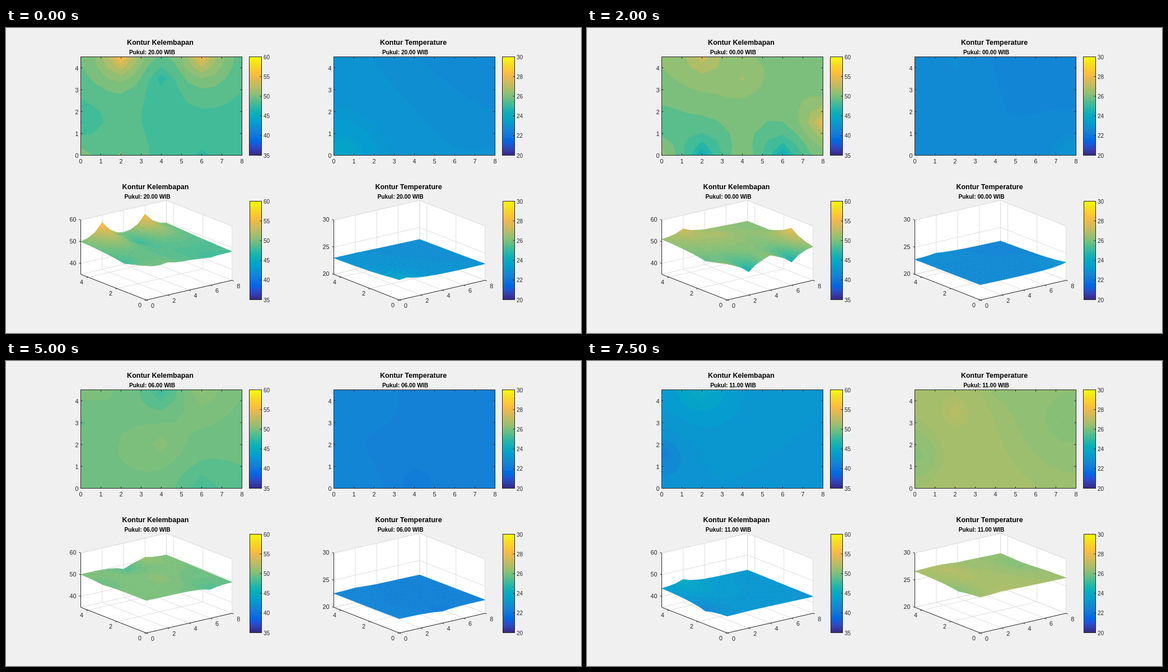
Animation, 1027 px wide and 545 px high, one loop 8 s. Source, as an HTML page with a canvas:

```html
<!DOCTYPE html>
<html lang="id">
<head>
<meta charset="utf-8">
<title>Kontur</title>
<style>
  html, body { margin: 0; width: 100%; height: 100%; overflow: hidden; background: #f0f0f0; }
  canvas, svg { position: absolute; left: 0; top: 0; width: 1027px; height: 545px; }
  text { font-family: "Liberation Sans", Arial, sans-serif; fill: #262626; }
  .bold { font-weight: bold; fill: #000; }
</style>
</head>
<body>
<canvas id="plot" width="1027" height="545"></canvas>
<svg id="labels" viewBox="0 0 1027 545"></svg>
<script>
const ctx = document.getElementById('plot').getContext('2d');
const labels = document.getElementById('labels');
const STEP_MS = 500, STEPS = 16, FIRST_HOUR = 20, DAWN = 8, INK = '#262626';
const NX = 12, NY = 9, W = 8, H = 4.5;

// The mean follows the night until dawn, then the morning.
// A peak is [x, y, height, step at which it is strongest].
const humidity = {
  mean: s => s < DAWN ? 48.7 + 0.43 * s : 52.1 - (s - DAWN) * (1 + 0.04 * (s - DAWN)),
  tilt: [-0.06, 0.08], reach: 0.95,
  peaks: [
    [2, 4.5, 7.8, 0], [6, 4.5, 7.3, 0], [4, 3.5, -3, 0], [2, 0, 2, 0],
    [0, 1.5, -4.8, 2], [0, 0, 6, 2], [2, 0, -6.5, 3], [6, 0, -6.5, 3], [4, 0, 2.5, 3],
    [8, 1.5, 5.5, 4], [4, 3.5, 2, 3], [2, 4.5, 3, 4.5], [8, 3, -2.6, 6],
    [4, 4.5, -3.4, 7], [0, 3, -2.4, 8],
    [4, 4.5, -2.6, 11], [6, 4.5, 2, 11], [4, 2, 1.5, 11], [6, 0, -1.8, 11],
    [2, 4.5, 2.2, 15], [0, 1.5, -2.2, 15]
  ]
};
const temperature = {
  mean: s => s < DAWN ? 22.95 - 0.02 * s * s : 21.67 + (s - DAWN) * (0.3 + 0.058 * (s - DAWN)),
  tilt: [-0.02, -0.03], reach: 1.3,
  peaks: [
    [0.5, 0, 0.9, 0], [2, 4.5, 0.5, 3], [8, 0, 0.9, 3], [3, 3, 0.2, 6], [2, 2, -0.25, 8],
    [4, 0, -0.5, 11], [2, 4.5, 0.3, 11], [2, 0, 0.5, 13], [4, 4.5, -0.4, 13],
    [2, 3.5, 0.5, 15], [0, 1.5, -0.7, 15], [7.5, 3, -0.5, 15]
  ]
};
const panels = [
  { name: 'Kontur Kelembapan', dx: 0, field: humidity, lo: 35, hi: 60, zTicks: [40, 50, 60], barStep: 5 },
  { name: 'Kontur Temperature', dx: 452, field: temperature, lo: 20, hi: 30, zTicks: [20, 25, 30], barStep: 2 }
];
const bars = [{ x: 434.5, y: 51.5, w: 22 }, { x: 435.5, y: 309.5, w: 21 }];
const BAR_HEIGHT = 176;

const stops = ('352a87 353dad 2053d4 0268e1 0d75dc 1481d6 108ed2 079ccf 06a7c6 0faeb9 25b5a9 ' +
  '42bb98 65be86 87bf77 a5be6b c0bc60 d9ba56 f1b94a ffc337 fad32a f5e41d f9fb0e')
  .split(' ').map(hex => [0, 2, 4].map(i => parseInt(hex.slice(i, i + 2), 16)));
const colours = Array.from({ length: 64 }, (_, i) => {
  const k = Math.min(stops.length - 2, Math.floor(i / 3)), f = i / 3 - k;
  return `rgb(${stops[k].map((c, j) => Math.round(c + (stops[k + 1][j] - c) * f))})`;
});
const colourOf = (p, v) =>
  colours[Math.max(0, Math.min(63, Math.floor((v - p.lo) / (p.hi - p.lo) * 64)))];

// Pointed peaks that swell and fade over about two steps, on a tilted plane.
function sampleGrid({ mean, tilt, reach, peaks }, step) {
  const active = peaks.map(([x, y, height, at]) => [x, y, height * Math.exp(-(((step - at) / 2) ** 2))]);
  return Array.from({ length: NY + 1 }, (_, j) => Array.from({ length: NX + 1 }, (_, i) => {
    const x = i * W / NX, y = j * H / NY;
    const plane = mean(step) + tilt[0] * (x - W / 2) + tilt[1] * (y - H / 2);
    return active.reduce((v, [a, b, h]) => v + h * Math.exp(-Math.hypot(x - a, y - b) / reach), plane);
  }));
}

function levelStep(range) {
  const decade = 10 ** Math.floor(Math.log10(range)), n = range / decade;
  return decade / (n < 1.2 ? 10 : n < 2.4 ? 5 : n < 6 ? 2 : 1);
}

function trace(points) {
  points.forEach((q, i) => i ? ctx.lineTo(q[0], q[1]) : ctx.moveTo(q[0], q[1]));
}
function line(colour, ...points) {
  ctx.strokeStyle = colour;
  ctx.lineWidth = 1;
  ctx.beginPath();
  trace(points);
  ctx.stroke();
}
function fill(colour, points) {
  ctx.fillStyle = colour;
  ctx.beginPath();
  trace(points);
  ctx.closePath();
  ctx.fill();
}
function frame(x, y, w, h) {
  ctx.strokeStyle = INK;
  ctx.lineWidth = 1;
  ctx.strokeRect(x, y, w, h);
}

// The part of a cell that lies above a level.
function clipAbove(corners, level) {
  const out = [];
  corners.forEach((a, i) => {
    const b = corners[(i + 1) % corners.length];
    if (a[2] >= level) out.push(a);
    if ((a[2] >= level) !== (b[2] >= level)) {
      const f = (level - a[2]) / (b[2] - a[2]);
      out.push([a[0] + (b[0] - a[0]) * f, a[1] + (b[1] - a[1]) * f]);
    }
  });
  return out;
}

function drawContour(p, grid) {
  const left = 133.5 + p.dx, top = 51.5, width = 288, height = 176;
  const px = x => left + x * width / W, py = y => top + height * (1 - y / H);
  const all = grid.flat(), min = Math.min(...all), max = Math.max(...all);
  const gap = levelStep(max - min);
  ctx.fillStyle = colourOf(p, min);
  ctx.fillRect(left, top, width, height);
  for (let n = Math.ceil(min / gap); n * gap < max; n++) {
    ctx.fillStyle = colourOf(p, n * gap + 1e-6);
    ctx.beginPath();
    for (let j = 0; j < NY; j++) for (let i = 0; i < NX; i++) {
      const corners = [[i, j], [i + 1, j], [i + 1, j + 1], [i, j + 1]]
        .map(([a, b]) => [px(a * W / NX), py(b * H / NY), grid[b][a]]);
      const part = clipAbove(corners, n * gap);
      if (part.length > 2) { trace(part); ctx.closePath(); }
    }
    ctx.fill();
  }
  frame(left, top, width, height);
  for (let x = 1; x < W; x++)
    for (const [y, d] of [[top + height, -3], [top, 3]]) line(INK, [px(x), y], [px(x), y + d]);
  for (let y = 1; y < H; y++)
    for (const [x, d] of [[left, 3], [left + width, -3]]) line(INK, [x, py(y)], [x + d, py(y)]);
}

const project = (p, x, y, z) => [
  250.5 + p.dx + 19.15 * x - 26 * y,
  486 - 4.4 * x - 10.2 * y - 97 * (z - p.lo) / (p.hi - p.lo)
];

function drawSurface(p, grid) {
  const at = (x, y, z) => project(p, x, y, z);
  const { lo, hi } = p, pale = '#dedede';
  fill('#fff', [at(0, 0, lo), at(W, 0, lo), at(W, 0, hi), at(W, H, hi), at(0, H, hi), at(0, H, lo)]);
  for (const x of [0, 2, 4, 6, 8]) line(pale, at(x, 0, lo), at(x, H, lo), at(x, H, hi));
  for (const y of [0, 2, 4, H]) line(pale, at(0, y, lo), at(W, y, lo), at(W, y, hi));
  for (const z of [...p.zTicks, hi]) line(pale, at(0, H, z), at(W, H, z), at(W, 0, z));

  const sub = 3, cols = NX * sub, rows = NY * sub;
  const value = (i, j) => {
    const a = Math.min(NX - 1, Math.floor(i / sub)), b = Math.min(NY - 1, Math.floor(j / sub));
    const f = i / sub - a, g = j / sub - b;
    return (grid[b][a] * (1 - f) + grid[b][a + 1] * f) * (1 - g) +
      (grid[b + 1][a] * (1 - f) + grid[b + 1][a + 1] * f) * g;
  };
  const node = (i, j) => at(i * W / cols, j * H / rows, value(i, j));
  ctx.lineWidth = 0.6;
  for (let i = cols - 1; i >= 0; i--) for (let j = rows - 1; j >= 0; j--) {
    const colour = colourOf(p, value(i + 0.5, j + 0.5));
    fill(colour, [node(i, j), node(i + 1, j), node(i + 1, j + 1), node(i, j + 1)]);
    ctx.strokeStyle = colour;
    ctx.stroke();
  }

  line(INK, at(0, H, hi), at(0, H, lo), at(0, 0, lo), at(W, 0, lo));
  const tick = ([x, y], dx, dy) => line(INK, [x, y], [x + dx, y + dy]);
  for (const x of [0, 2, 4, 6, 8]) tick(at(x, 0, lo), 3, 1.2);
  for (const y of [0, 2, 4]) tick(at(0, y, lo), -3, 0.7);
  for (const z of p.zTicks) tick(at(0, H, z), -3, -1);
}

const barY = (p, bar, v) => bar.y + BAR_HEIGHT * (p.hi - v) / (p.hi - p.lo);

function drawBar(p, bar) {
  const left = bar.x + p.dx, right = left + bar.w;
  colours.forEach((c, i) => {
    const edge = n => Math.round(bar.y + BAR_HEIGHT * (1 - n / 64));
    ctx.fillStyle = c;
    ctx.fillRect(left, edge(i + 1), bar.w, edge(i) - edge(i + 1));
  });
  frame(left, bar.y, bar.w, BAR_HEIGHT);
  for (let v = p.lo + p.barStep; v < p.hi; v += p.barStep)
    line(INK, [right, barY(p, bar, v)], [right - 3, barY(p, bar, v)]);
}

function label(content, x, y, size, anchor = 'middle', cls = '') {
  const t = document.createElementNS('http://www.w3.org/2000/svg', 'text');
  const attributes = { x, y: y + size * 0.36, 'font-size': size, 'text-anchor': anchor, class: cls };
  for (const key in attributes) t.setAttribute(key, attributes[key]);
  t.textContent = content;
  labels.append(t);
  return t;
}

const clocks = [];
for (const p of panels) {
  const { dx } = p;
  label(p.name, 275.5 + dx, 25, 12.5, 'middle', 'bold');
  label(p.name, 267 + dx, 283, 12.5, 'middle', 'bold');
  clocks.push(label('', 261 + dx, 43, 10.2, 'middle', 'bold'));
  clocks.push(label('', 252.5 + dx, 301, 10.2, 'middle', 'bold'));
  for (let x = 0; x <= W; x++) label(x, 133.5 + dx + x * 36, 238.5, 10.8);
  for (let y = 0; y <= H; y++) label(y, 129.5 + dx, 228 - y * 39, 10.8, 'end');
  for (const bar of bars)
    for (let v = p.lo; v <= p.hi; v += p.barStep)
      label(v, 460 + dx, barY(p, bar, v) + 0.5, 10, 'start');
  for (const x of [0, 2, 4, 6, 8]) {
    const [a, b] = project(p, x, 0, p.lo);
    label(x, a + 11.5, b + 10, 10.8);
  }
  for (const y of [0, 2, 4]) {
    const [a, b] = project(p, 0, y, p.lo);
    label(y, a - 11.5, b + 9, 10.8);
  }
  for (const z of p.zTicks) {
    const [a, b] = project(p, 0, H, z);
    label(z, a - 8, b - 0.5, 10.8, 'end');
  }
}

function draw(step) {
  ctx.fillStyle = '#f0f0f0';
  ctx.fillRect(0, 0, 1027, 545);
  for (const p of panels) {
    const grid = sampleGrid(p.field, step);
    drawContour(p, grid);
    drawSurface(p, grid);
    bars.forEach(bar => drawBar(p, bar));
  }
  const hour = String((FIRST_HOUR + step) % 24).padStart(2, '0');
  clocks.forEach(t => { t.textContent = `Pukul: ${hour}.00 WIB`; });
}

const start = performance.now();
let shown = -1;
function play() {
  const step = Math.floor((performance.now() - start) / STEP_MS) % STEPS;
  if (step !== shown) draw(shown = step);
  requestAnimationFrame(play);
}
play();
</script>
</body>
</html>
```
